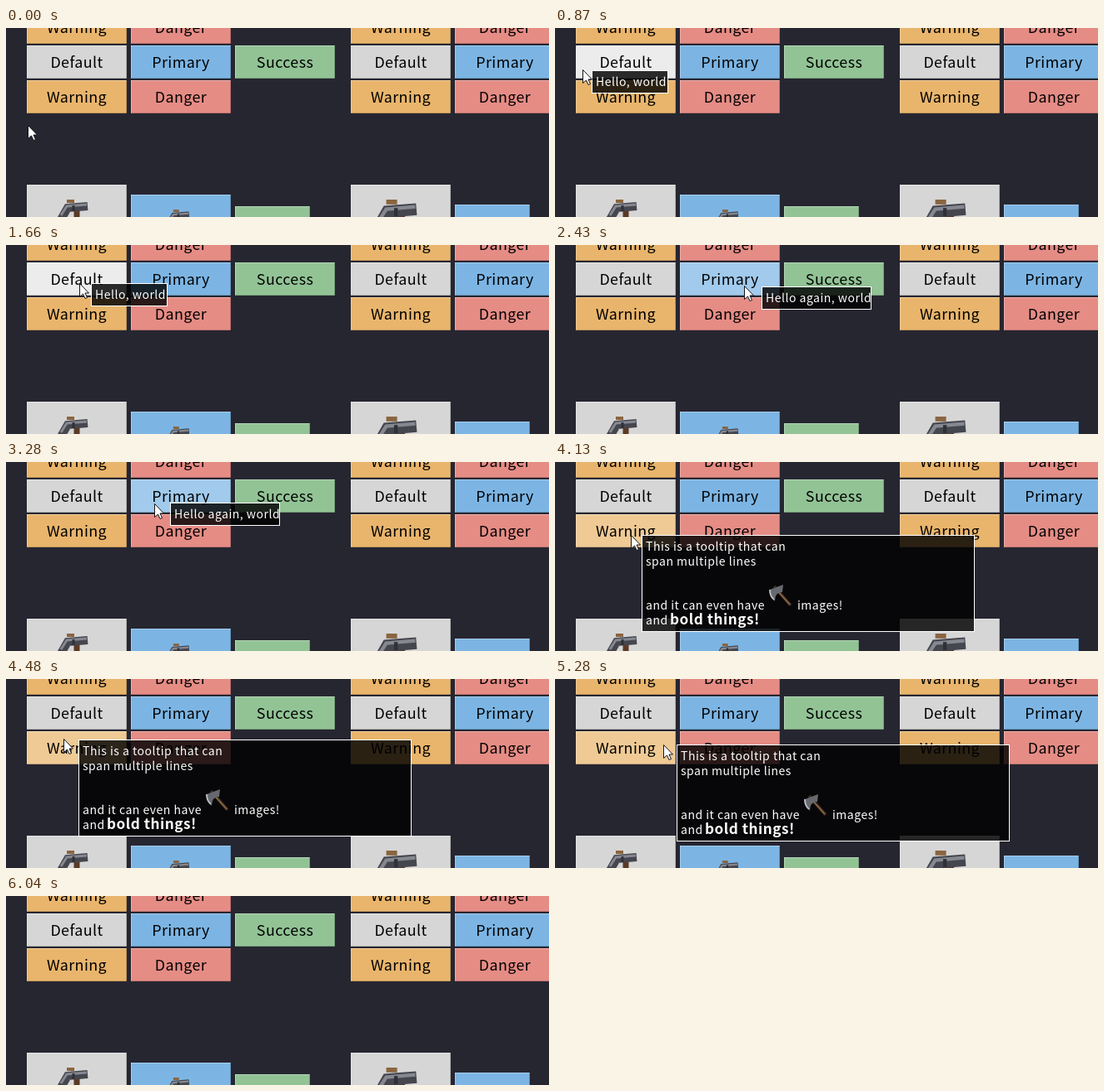
Write an HTML page with a canvas that moves like this. It is 652 px wide and 228 px high and loops after 6460 ms.

```html
<!DOCTYPE html>
<html lang="en">
<head>
<meta charset="utf-8">
<title>Button tooltips</title>
<style>
  html, body { margin: 0; height: 100%; overflow: hidden; background: #262631; }
  canvas { display: block; }
</style>
</head>
<body>
<canvas id="stage" width="652" height="228"></canvas>
<script>
const ctx = document.getElementById('stage').getContext('2d');
const LOOP = 6460, LAG = 32, TIP_OFFSET = 16, POINTER_GONE = 6035;
const FONT = '"Noto Sans CJK JP", "Noto Sans CJK SC", "Noto Sans", sans-serif';
const COLUMNS = [25, 414], COLUMN_STEP = 125, ROW_STEP = 42, FIRST_ROW = -21;

const COLORS = {
  Default: '#d6d6d6', Primary: '#7cb5e4', Success: '#92c395', Warning: '#e9b56c', Danger: '#e58c85'
};
const ROWS = [['Warning', 'Danger'], ['Default', 'Primary', 'Success'], ['Warning', 'Danger']];

const buttons = COLUMNS.flatMap(left => ROWS.flatMap((labels, row) => labels.map((label, col) => (
  { label, x: left + col * COLUMN_STEP, y: FIRST_ROW + row * ROW_STEP, w: 120, h: 40 }
))));

const cards = [
  { label: 'Default', x: 25, y: 189, w: 120, icon: 1 },
  { label: 'Primary', x: 150, y: 201, w: 120, icon: .76 },
  { label: 'Success', x: 275, y: 215, w: 90, icon: 0 },
  { label: 'Default', x: 414, y: 189, w: 120, icon: 1.45 },
  { label: 'Primary', x: 539, y: 213, w: 90, icon: .8 }
];

// Turning points of the pointer: time, x, y
const PATH = [
  [130, 26, 117], [480, 9, 78], [750, 19, 53], [1260, 86, 46], [1628, 86, 46], [1660, 88, 46],
  [2370, 234, 50], [2690, 156, 38], [2990, 198, 45], [3280, 178, 50], [3480, 110, 62],
  [3650, 110, 79], [3860, 49, 82], [4130, 91, 88], [4260, 97, 84], [4480, 69, 72],
  [4920, 124, 85], [5040, 130, 79], [5280, 130, 79], [5600, 140, 102], [5900, 492, 168],
  [6000, 638, 195]
];

const slope = (i, axis) => (PATH[i + 1][axis] - PATH[i][axis]) / (PATH[i + 1][0] - PATH[i][0]);

// Tangent that never overshoots the keys
function tangent(i, axis) {
  if (i === 0 || i === PATH.length - 1) return 0;
  const a = slope(i - 1, axis), b = slope(i, axis);
  return a * b > 0 ? 2 * a * b / (a + b) : 0;
}

function pointerAt(t) {
  const last = PATH.length - 1;
  t = Math.min(Math.max(t, PATH[0][0]), PATH[last][0]);
  let i = 0;
  while (i < last - 1 && t > PATH[i + 1][0]) i++;
  const span = PATH[i + 1][0] - PATH[i][0], u = (t - PATH[i][0]) / span;
  return [1, 2].map(axis => {
    const p = PATH[i][axis], q = PATH[i + 1][axis];
    const ease = u * u * (3 - 2 * u);
    return Math.round(p + (q - p) * ease + span * (tangent(i, axis) * u * (1 - u) ** 2
      - tangent(i + 1, axis) * u * u * (1 - u)));
  });
}

function rect(x, y, w, h, color) {
  ctx.fillStyle = color;
  ctx.fillRect(x, y, w, h);
}

function text(str, x, y, { size = 14, color = '#fff', weight = 400, align = 'left', spacing = .5 } = {}) {
  ctx.font = `${weight} ${size}px ${FONT}`;
  ctx.letterSpacing = spacing + 'px';
  ctx.textAlign = align;
  ctx.fillStyle = color;
  ctx.fillText(str, x, y);
}

function line(color, width, path) {
  ctx.strokeStyle = color;
  ctx.lineWidth = width;
  ctx.stroke(new Path2D(path));
}

function at(x, y, scale, draw) {
  ctx.save();
  ctx.translate(x, y);
  ctx.scale(scale, scale);
  draw();
  ctx.restore();
}

function panel({ x, y, w, h = 60, label }, hovered) {
  rect(x, y, w, h, COLORS[label]);
  if (hovered) rect(x, y, w, h, label === 'Default' ? 'rgba(255,255,255,.55)' : 'rgba(255,255,255,.28)');
  rect(x, y, w, 1, 'rgba(255,255,255,.3)');
  rect(x, y, 1, h, 'rgba(255,255,255,.3)');
  rect(x, y + h - 1, w, 1, 'rgba(0,0,0,.18)');
  rect(x + w - 1, y, 1, h, 'rgba(0,0,0,.18)');
}

function hammer() {
  line('#5b3a26', 7, 'M24 10V24');
  line('#45464e', 10, 'M5 24L13 10L37 8');
  line('#858891', 3, 'M5 19L12 8L36 6');
  line('#303138', 3, 'M20 7V14');
  line('#8a6540', 4, 'M12 2H21');
}

function axe() {
  line('#3b2a20', 4, 'M7 2L27 25');
  line('#94704a', 1.5, 'M9 5L26 24');
  ctx.fillStyle = '#66696f';
  ctx.fill(new Path2D('M2 6L18 0L17 9Q8 9 8 20Q2 14 2 6'));
  line('#b9bdc1', 2, 'M2 6Q2 14 7 18');
}

function axeTip(x, y) {
  const baseline = row => Math.round(y + 19 + row * 17.75);
  text('This is a tooltip that can', x + 5, baseline(0));
  text('span multiple lines', x + 5, baseline(1));
  text('and it can even have', x + 5, baseline(4));
  at(x + 152, y + 60, 1, axe);
  text('images!', x + 187, baseline(4));
  text('and', x + 5, baseline(5));
  text('bold things!', x + 34, baseline(5), { size: 17.2, weight: 700 });
}

const hello = str => (x, y) => text(str, x + 5, y + 19);
const TIPS = {
  Default: { w: 92, h: 28, draw: hello('Hello, world') },
  Primary: { w: 132, h: 28, draw: hello('Hello again, world') },
  Warning: { w: 400, h: 117, draw: axeTip }
};

function drawTip({ w, h, draw }, x, y) {
  rect(x, y, w, h, 'rgba(0,0,0,.82)');
  ctx.strokeStyle = '#fff';
  ctx.lineWidth = 1;
  ctx.strokeRect(x + .5, y + .5, w - 1, h - 1);
  draw(x, y);
}

function drawPointer() {
  const arrow = 'M0 0V16L4 12.5L6.5 18L9 17L6.5 11.5H11Z';
  ctx.fillStyle = '#fff';
  ctx.fill(new Path2D(arrow));
  line('#15151a', 1, arrow);
}

function render(t) {
  const [px, py] = pointerAt(t);
  const hovered = buttons.find(b => px >= b.x && px < b.x + b.w && py >= b.y && py < b.y + b.h);

  rect(0, 0, 652, 228, '#262631');
  for (const b of buttons) {
    panel(b, b === hovered);
    text(b.label, b.x + b.w / 2, b.y + 27, { size: 17.9, color: '#000', align: 'center', spacing: .4 });
  }
  for (const c of cards) {
    panel(c);
    if (c.icon) at(c.x + c.w / 2 - 24 * c.icon, c.y + 18, c.icon, hammer);
  }

  if (t >= POINTER_GONE) return;
  if (hovered && TIPS[hovered.label]) {
    const [x, y] = pointerAt(t - LAG);
    drawTip(TIPS[hovered.label], x + TIP_OFFSET, y);
  }
  at(px + .5, py + .5, 1, drawPointer);
}

function tick(now) {
  render(now % LOOP);
  requestAnimationFrame(tick);
}
requestAnimationFrame(tick);
</script>
</body>
</html>
```
